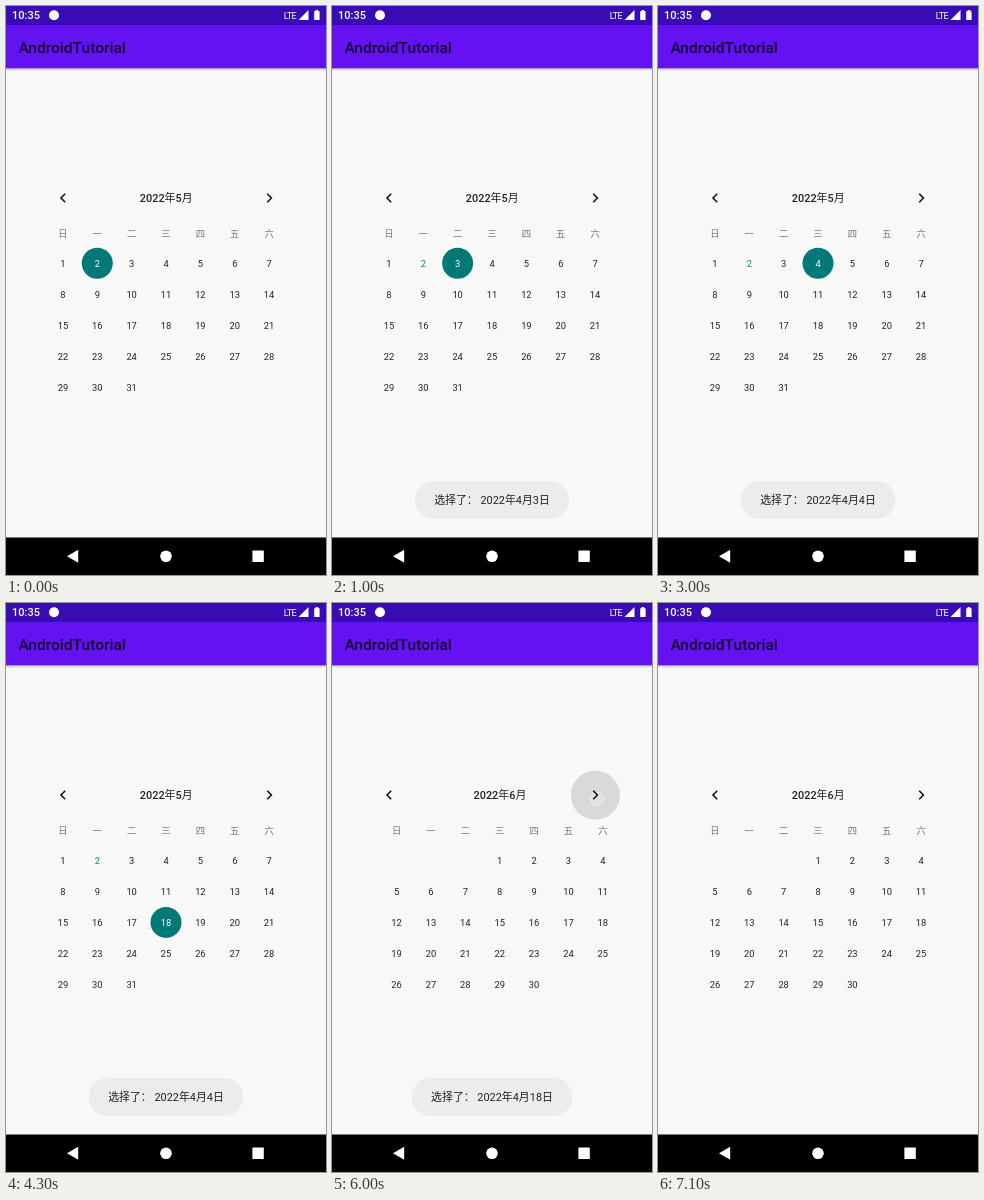
Write an HTML page that moves like this. It is 320 px wide and 569 px high and loops after 8000 ms.

```html
<!DOCTYPE html>
<html lang="zh-CN">
<head>
<meta charset="utf-8">
<title>Calendar</title>
<style>
  html, body { margin: 0; width: 100%; height: 100%; overflow: hidden; background: #f8f8f8; }
  svg { display: block; width: 100%; height: 100%; }
  text { font: 9.33px Roboto, "Noto Sans CJK SC", "Noto Sans CJK", sans-serif; fill: #222; }
  .mid { text-anchor: middle; }
  .title { font-size: 10.9px; font-weight: 500; }
  .week { fill: #777; }
  .toast text { font-size: 10.9px; white-space: pre; }
  .chevron { fill: none; stroke: #151515; stroke-width: 1.6; }
</style>
</head>
<body>
<svg id="stage" viewBox="0 0 320 569">
  <defs>
    <linearGradient id="shade" x2="0" y2="1">
      <stop stop-color="#000" stop-opacity=".2"/>
      <stop offset="1" stop-color="#000" stop-opacity="0"/>
    </linearGradient>
    <clipPath id="pager"><rect x="30" y="170" width="260" height="235"/></clipPath>
  </defs>
  <rect width="320" height="569" fill="#f8f8f8"/>
  <rect y="62" width="320" height="3.5" fill="url(#shade)"/>
  <rect y="18" width="320" height="44.3" fill="#6512f2"/>
  <rect width="320" height="19" fill="#390bb5"/>
  <g fill="#fff">
    <text x="6" y="13.4" style="font-size:11px;font-weight:500;fill:#fff">10:35</text>
    <circle cx="48" cy="9.2" r="5"/>
    <text x="277.8" y="12.6" style="font-size:9px;letter-spacing:-.7px;fill:#fff">LTE</text>
    <path d="M302.5 4V14H292.5ZM308.2 5.2H309.6V4H312.2V5.2H313.6V14H308.2Z"/>
  </g>
  <text x="12.4" y="46.8" style="font-size:15.56px;font-weight:500;fill:#14022f">AndroidTutorial</text>

  <g id="ripple">
    <circle id="wave" cx="263.4" cy="192.2" fill="#d9d9d9"/>
    <circle id="touch" cx="265" cy="196.4" r="8.7" fill="#e2e2e2" stroke="#c8c8c8" stroke-width=".6"/>
  </g>
  <g clip-path="url(#pager)"><g id="may"></g><g id="june"></g></g>
  <path class="chevron" d="M59.2 187.8L55 192L59.2 196.2M261.2 187.8L265.4 192L261.2 196.2"/>
  <g id="toasts"></g>

  <rect y="531.5" width="320" height="37.5"/>
  <g fill="#fff">
    <path d="M61 550.3L72.2 543.8V556.8Z"/>
    <circle cx="160" cy="550.3" r="5.8"/>
    <rect x="246.4" y="544.6" width="11.4" height="11.4" rx=".6"/>
  </g>
</svg>
<script>
const LOOP = 8000, STEP = 100, PAGE = 260;
const TEAL = '#027977';
const $ = id => document.getElementById(id);
const clamp = v => Math.max(0, Math.min(1, v));

function add(parent, tag, attrs, content = '') {
  const node = document.createElementNS('http://www.w3.org/2000/svg', tag);
  for (const key in attrs) node.setAttribute(key, attrs[key]);
  node.textContent = content;
  return parent.appendChild(node);
}

const columnX = i => 56.9 + 34.37 * i;
const rowY = i => 257.2 + 31.1 * i;

function buildMonth(page, title, firstWeekday, dayCount) {
  const marker = add(page, 'circle', { r: 15.5, fill: TEAL });
  add(page, 'text', { class: 'mid title', x: 160.2, y: 195.6 }, title);
  [...'日一二三四五六'].forEach((name, i) =>
    add(page, 'text', { class: 'mid week', x: columnX(i), y: 230.9 }, name));
  const days = [];
  for (let day = 1; day <= dayCount; day++) {
    const cell = firstWeekday + day - 1;
    const x = columnX(cell % 7), y = rowY(Math.floor(cell / 7));
    days[day] = { x, y, label: add(page, 'text', { class: 'mid', x, y: y + 3.4 }, day) };
  }
  return { marker, days };
}

const may = buildMonth($('may'), '2022年5月', 0, 31);
buildMonth($('june'), '2022年6月', 3, 30).marker.remove();

// Taps on a day: press, selection, then the toast fading in.
const taps = [
  { day: 3, press: 500, select: 600, toast: 600, width: 154.4 },
  { day: 4, press: 2300, select: 2500, toast: 2600, width: 154.4 },
  { day: 18, press: 4000, select: 4200, toast: 4600, width: 160.6 }
];
for (const tap of taps) {
  tap.node = add($('toasts'), 'g', { class: 'toast' });
  add(tap.node, 'rect', { x: 160 - tap.width / 2, y: 474.8, width: tap.width, height: 38.2, rx: 19.1, fill: '#ececec' });
  add(tap.node, 'text', { class: 'mid', x: 160, y: 498.1 }, `选择了： 2022年4月${tap.day}日`);
}
const TOAST_END = 6700;
const pressed = add($('may'), 'circle', { r: 15.5, fill: TEAL, opacity: .25 });

function drawSelection(t) {
  const current = taps.filter(tap => t >= tap.select).pop();
  const selected = current ? current.day : 2;
  const { x, y } = may.days[selected];
  may.marker.setAttribute('cx', x);
  may.marker.setAttribute('cy', y);
  may.days.forEach(({ label }, day) =>
    label.style.fill = day === selected ? '#fff' : day === 2 ? '#018786' : '');

  const held = taps.find(tap => t >= tap.press && t < tap.select);
  pressed.style.display = held ? '' : 'none';
  if (held) {
    pressed.setAttribute('cx', may.days[held.day].x);
    pressed.setAttribute('cy', may.days[held.day].y);
  }
}

function drawToasts(t) {
  const fade = start => clamp((t - start + STEP) / 500);
  taps.forEach((tap, i) => {
    const end = i + 1 < taps.length ? taps[i + 1].toast : TOAST_END;
    tap.node.setAttribute('opacity', fade(tap.toast) * (1 - fade(end)));
  });
}

function drawPager(t) {
  const offset = PAGE * (1 - clamp((t - 5899) / 200)) ** 5;
  $('may').setAttribute('transform', `translate(${offset - PAGE})`);
  $('june').setAttribute('transform', `translate(${offset})`);

  $('ripple').style.display = t >= 5800 && t < 6200 ? '' : 'none';
  $('wave').setAttribute('r', t < 5900 ? 14 : 24.5);
  $('wave').setAttribute('opacity', t < 6100 ? 1 : .5);
  $('touch').style.display = t < 6100 ? '' : 'none';
}

function frame() {
  const t = Math.floor(performance.now() % LOOP / STEP) * STEP;
  drawSelection(t);
  drawToasts(t);
  drawPager(t);
  requestAnimationFrame(frame);
}
frame();
</script>
</body>
</html>
```
